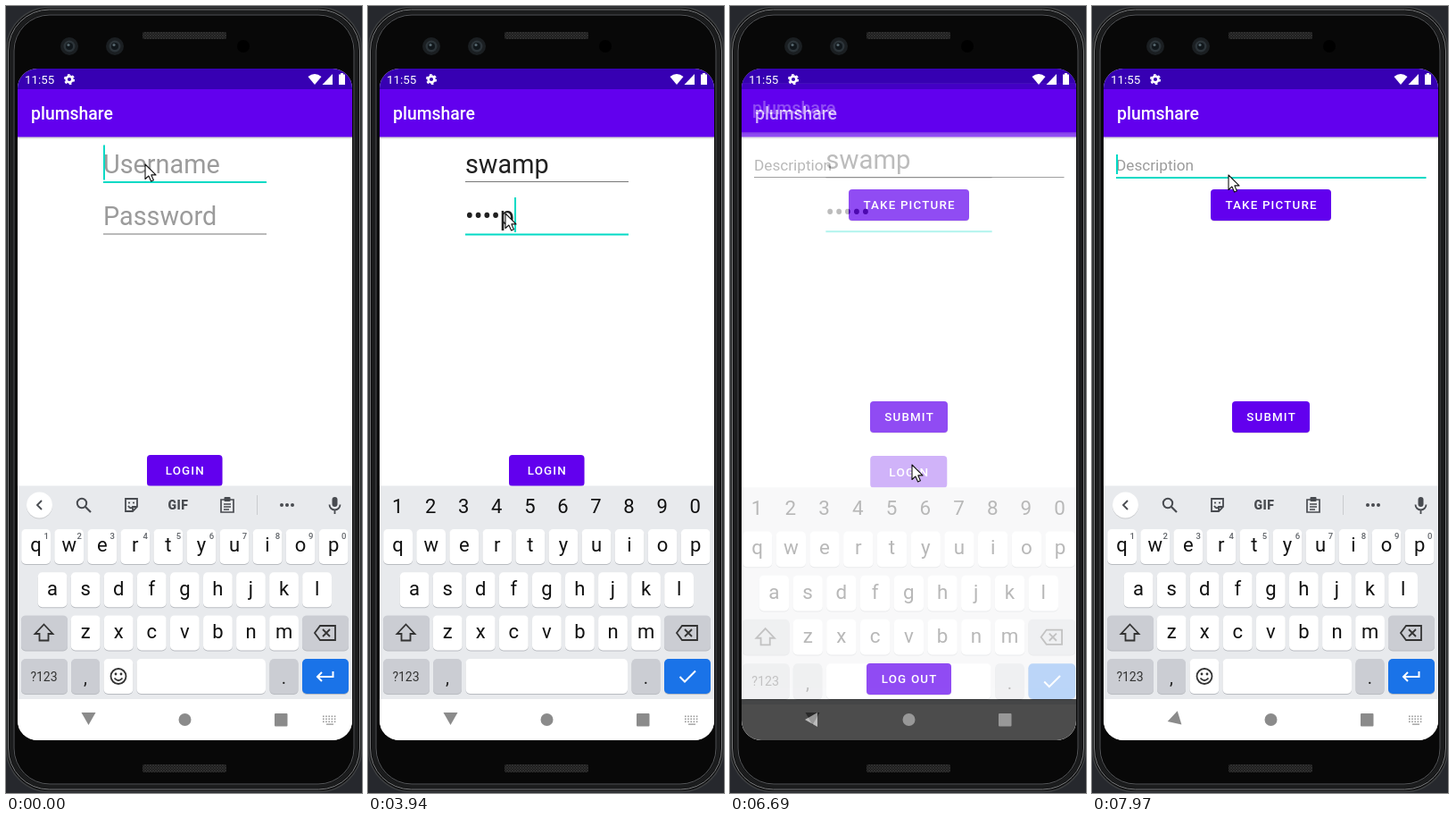
Animation of 399 by 880 pixels, one loop 8000 ms. Source, as an HTML page:

```html
<!DOCTYPE html>
<html lang="en">
<head>
<meta charset="utf-8">
<title>Login demo</title>
<style>
html, body { margin: 0; width: 100%; height: 100%; overflow: hidden; background: #26282d; }
svg { display: block; width: 399px; height: 880px; font-family: Roboto, sans-serif; }
</style>
</head>
<body>
<svg id="stage" viewBox="0 0 399 880">
  <defs>
    <clipPath id="glass"><rect x="13" y="70" width="375" height="751" rx="22"/></clipPath>
    <linearGradient id="drop" x2="0" y2="1"><stop stop-opacity=".2"/><stop offset="1" stop-opacity="0"/></linearGradient>
    <pattern id="mesh" width="3" height="3" patternUnits="userSpaceOnUse">
      <rect width="3" height="3" fill="#1c1c1c"/><path d="M0 0L3 3M3 0L0 3" stroke="#363636" stroke-width=".7"/>
    </pattern>
  </defs>
  <g id="phone" fill="none">
    <rect x=".5" y="1.5" width="398" height="877" rx="48" fill="#101011" stroke="#3e4042" stroke-width="1.5"/>
    <rect x="2.5" y="4" width="394" height="872" rx="46" stroke="#7c7e80"/>
    <rect x="6" y="7" width="387" height="866" rx="43" stroke="#1b1c1d" stroke-width="4"/>
    <rect x="9" y="10" width="381" height="860" rx="40" fill="#080808" stroke="#55575a"/>
    <rect x="153" y="29" width="94" height="8" rx="2" fill="url(#mesh)"/>
    <rect x="153" y="848" width="94" height="9" rx="2" fill="url(#mesh)"/>
    <g id="lenses"></g>
    <circle cx="266" cy="45" r="7" fill="#000"/>
  </g>
  <g id="screen" clip-path="url(#glass)"></g>
  <path id="mouse" d="M0 0V16.5L3.9 13L6.6 19L9.4 17.8L6.8 11.9H12Z" fill="#fff" stroke="#111" stroke-width="1.1" stroke-linejoin="round"/>
</svg>
<script>
const $ = id => document.getElementById(id);
const PURPLE = '#6200ee', TEAL = '#03dac5', INK = '#212121', HINT = '#9b9b9b', GREY = '#484b50';
const BIG = 28.8, SMALL = 17.2;

// Timelines: [start ms, value...], each value holds until the next one.
const user = [[0, ''], [130, 's'], [260, 'sw'], [500, 'swa'], [800, 'swam'], [950, 'swamp']];
const pass = [[0, ''], [2920, 's'], [3060, '•w'], [3350, '••a'], [3480, '•••m'], [3940, '••••p'], [4910, '•••••']];
const strips = [[0, ''], [260, 'so,sw,see'], [500, 'sea,swa,say'], [800, 'swan,swam,swamp'], [1100, 'swam,swamp,swamps']];
const caret = [[0, 1], [1360, 0], [1800, 1], [2800, 0], [2920, 1], [4470, 0], [4910, 1], [5450, 0], [5880, 1], [6400, 0]];
const zoom = [[0, 1], [6400, 1.004], [6540, 1.009], [6690, 1.018]];
const slide = [[0, 240], [7720, 110], [7850, 20], [7970, 0]];
const mouse = [[0, 156, 177], [1800, 156, 190], [1930, 154, 218], [2060, 154, 232],
  [5040, 163, 280], [5180, 208, 400], [5310, 239, 500], [5450, 226, 519], [5600, 204, 513],
  [6930, 194, 330], [7060, 176, 114], [7180, 165, 199], [7330, 156, 192], [7460, 153, 189]];

const at = (list, t) => list.findLast(k => k[0] <= t);
const val = (list, t) => at(list, t)[1];

const ruler = document.createElement('canvas').getContext('2d');
const widthOf = s => { ruler.font = BIG + 'px Roboto, sans-serif'; return ruler.measureText(s).width; };

const rect = (x, y, w, h, fill, r = 0, more = '') =>
  `<rect x="${x}" y="${y}" width="${w}" height="${h}" rx="${r}" fill="${fill}" ${more}/>`;
const text = (s, x, y, size, fill, more = '') =>
  `<text x="${x}" y="${y}" font-size="${size}" fill="${fill}" ${more}>${s}</text>`;
const mid = (s, x, y, size, fill, more = '') => text(s, x, y, size, fill, 'text-anchor="middle" ' + more);
const path = (d, fill, more = '') => `<path d="${d}" fill="${fill}" ${more}/>`;
const line = (d, color, w = 2) => path(d, 'none', `stroke="${color}" stroke-width="${w}"`);
const dot = (x, y, r, fill, more = '') => `<circle cx="${x}" cy="${y}" r="${r}" fill="${fill}" ${more}/>`;

const button = (s, x, y, w, glow = 0) => rect(x, y + .7, w, 35, '#0002', 4) + rect(x, y, w, 35, PURPLE, 4) +
  (glow ? rect(x, y, w, 35, '#fff', 4, `opacity="${glow}"`) : '') +
  mid(s, x + w / 2 + .6, y + 22.3, 13.35, '#fff', 'font-weight="500" letter-spacing="1.19"');

function field(s, hint, x, y, w, size, focus, blink) {
  const big = size === BIG, ruleY = y + (big ? 9.5 : 7), end = x + (s ? widthOf(s) : 0);
  return text(s || hint, x, y, size, s ? INK : HINT) +
    (focus ? rect(x, ruleY, w, 2, TEAL) : rect(x, ruleY, w, 1, '#777')) +
    (focus && blink ? rect(end, y - (big ? 31 : 18), 2, big ? 39 : 22, TEAL) : '');
}

const header = () => rect(13, 60, 375, 33, '#3700b3') + rect(13, 93, 375, 53.5, PURPLE) +
  rect(13, 146.5, 375, 3, 'url(#drop)') + text('plumshare', 28, 127, 19.4, '#fff', 'font-weight="500"');

const status = () => text('11:55', 21, 87, 13.35, '#fff') +
  dot(71, 82, 3.4, 'none', 'stroke="#fff" stroke-width="2.6"') +
  dot(71, 82, 5.2, 'none', 'stroke="#fff" stroke-width="1.8" stroke-dasharray="2.7 2.74"') +
  path('M338.5 79Q346 73 353.5 79L346 88Z', '#fff') + path('M366 76V88H354.5Z', '#fff') +
  path('M373 76.5H375V75H378V76.5H380V88H373Z', '#fff');

const navBar = color => rect(5, 775, 391, 60, color);

function navIcons(color, turn, switcher) {
  let s = path('M84 798L98 790V806Z', color, `transform="rotate(${turn} 91.25 796.75)"`) +
    dot(200.5, 798, 7, color) + rect(301, 791, 14.5, 14.5, color, 1);
  if (switcher) {
    for (let i = 0; i < 15; i++) s += rect(355 + i % 5 * 3.2, 793.5 + (i / 5 | 0) * 3, 1.6, 1.6, '#999');
    s += rect(359, 802.5, 8, 1.3, '#999');
  }
  return s;
}

const mic = () => rect(365.5, 549, 6, 11, GREY, 3) + line('M362.5 557.5A6 6 0 0 0 374.5 557.5M368.5 563.5V568', GREY, 1.8);

function topStrip(words) {
  let s = dot(37.5, 559, 14.5, '#0002') + dot(37.5, 558, 14.5, '#fff');
  if (words) {
    s += line('M35 553L40 558L35 563', GREY, 1.8) + rect(145, 546, 1, 23, '#cacccf') + rect(254, 546, 1, 23, '#cacccf');
    words.split(',').forEach((w, i) => s += mid(w, 97 + i * 102.5, 565, SMALL, GREY));
  } else {
    s += line('M40 553L35 558L40 563', GREY, 1.8) +
      dot(85, 556, 5.2, 'none', `stroke="${GREY}" stroke-width="2"`) + line('M89 560L95 566', GREY, 2.2) +
      line('M134 551H147V560L142 565H134ZM142 565V560H147M137 559Q139.5 563 142 560', GREY, 1.8) +
      dot(138, 555.5, 1.1, GREY) + dot(143, 555.5, 1.1, GREY) +
      mid('GIF', 193, 563, 14, GREY, 'font-weight="900" letter-spacing=".5"') +
      line('M241 552H255V566H241ZM244 557H252M244 560H252M244 563H250', GREY, 1.7) + rect(244.5, 549, 7, 5, GREY, 1) +
      rect(281, 547, 1, 22, '#cacccf');
    for (const x of [309, 315, 321]) s += dot(x, 558, 2, GREY);
  }
  return s + mic();
}

function keyboard(secret, words) {
  const key = (x, y, w, fill = '#fff') => rect(x, y + 1, w, 39, '#b9bcc1', 5) + rect(x, y, w, 39, fill, 5);
  const soft = '#cbcdd3', pitch = 37.06;
  let s = rect(5, 536.5, 391, 245, '#e8eaed');
  ['qwertyuiop', 'asdfghjkl', 'zxcvbnm'].forEach((row, r) => [...row].forEach((c, i) => {
    const x = [33.6, 52.1, 89.2][r] + i * pitch, y = 585 + r * 48.2;
    s += key(x - 16.4, y, 32.8) + mid(c, x, y + 25.4, 22, '#111');
    if (r) return;
    const n = (i + 1) % 10;
    s += secret ? mid(n, x - .5, 567, 22, '#111') : mid(n, x + 11.5, 595.5, 9.5, '#5f6368', 'font-weight="500"');
  }));
  s += key(17, 681.4, 52, soft) + key(332, 681.4, 52, soft) + key(17, 730, 52, soft) + key(73, 730, 32, soft) +
    key(295.5, 730, 32, soft) + key(332, 730, 52, '#1a73e8') +
    line('M42.5 691.5L52.5 702H47.5V709.5H37.5V702H32.5Z', '#333', 1.8) +
    line('M352 693H369V709H352L346 701ZM355 697L363 705M363 697L355 705', '#333', 1.8) +
    mid('?123', 42.5, 754.5, 14, '#333') + mid(',', 89, 758, 20, '#222') + mid('.', 311.5, 758, 20, '#222');
  if (secret) return s + key(109.5, 730, 181.5) + line('M349.5 750L355 755.5L367 743.5', '#fff', 2);
  return s + key(109.5, 730, 32.8) + key(146.5, 730, 144.5) + topStrip(words) +
    dot(126, 749.5, 8.5, 'none', 'stroke="#333" stroke-width="1.8"') + dot(123, 747, 1.4, '#333') +
    dot(129, 747, 1.4, '#333') + line('M121.5 751.5Q126 757 130.5 751.5', '#333', 1.8) +
    line('M366.5 744V750H349M354 745L349 750L354 755', '#fff', 2);
}

function loginScreen(t) {
  const onPass = t >= 2190, name = val(user, t), on = val(caret, t);
  const glow = t >= 5880 && t < 6270 ? .2 : 0;
  return `<g transform="translate(200.5 440) scale(${val(zoom, t)}) translate(-200.5 -440)">` +
    rect(0, 60, 399, 780, '#fff') + header() +
    field(name, 'Username', 109, 186.5, 183, BIG, !onPass, on) +
    (name && !onPass ? rect(109, 188.5, widthOf(name), 1.5, INK) : '') +
    field(val(pass, t), 'Password', 109, 245, 183, BIG, onPass, on) +
    button('LOGIN', 158, 502, 84.5, glow) + keyboard(t >= 2330, val(strips, t)) + navBar('#fff') + '</g>' +
    navIcons('#8b8b8b', -90, t < 6400);
}

function postScreen(t) {
  const focus = t >= 7460, up = t >= 7720;
  return rect(13, 70, 375, 751, '#fff') + header() +
    field('', 'Description', 27, 184, 347.5, SMALL, focus, 1) +
    button('TAKE PICTURE', 133, 205, 135) + button('SUBMIT', 157, 442, 87) + button('LOG OUT', 153, 735, 95) +
    (up ? `<g transform="translate(0 ${val(slide, t)})">${keyboard(false, '')}</g>` : '') +
    (up ? navBar('#fff') + navIcons('#8b8b8b', t >= 7970 ? -17 : 0, true) : navBar('#000') + navIcons('#9e9e9e', 0, false));
}

function screen(t) {
  const fade = t < 6690 ? 0 : t < 6810 ? .7 : 1;
  return (fade < 1 ? loginScreen(t) : '') + (fade ? `<g opacity="${fade}">${postScreen(t)}</g>` : '') + status();
}

$('lenses').innerHTML = [71, 122].map(x => dot(x, 45, 10, '#1b1f22') + dot(x, 45, 6.5, '#2c3439') +
  dot(x, 45, 4, '#11171b') + dot(x - 1, 43.5, 1.6, '#586870')).join('');

let last = '';
function frame(now) {
  const t = now % 8000, s = screen(t), [, x, y] = at(mouse, t);
  if (s !== last) $('screen').innerHTML = last = s;
  $('mouse').setAttribute('transform', `translate(${x} ${y})`);
  requestAnimationFrame(frame);
}
frame(0);
</script>
</body>
</html>
```
